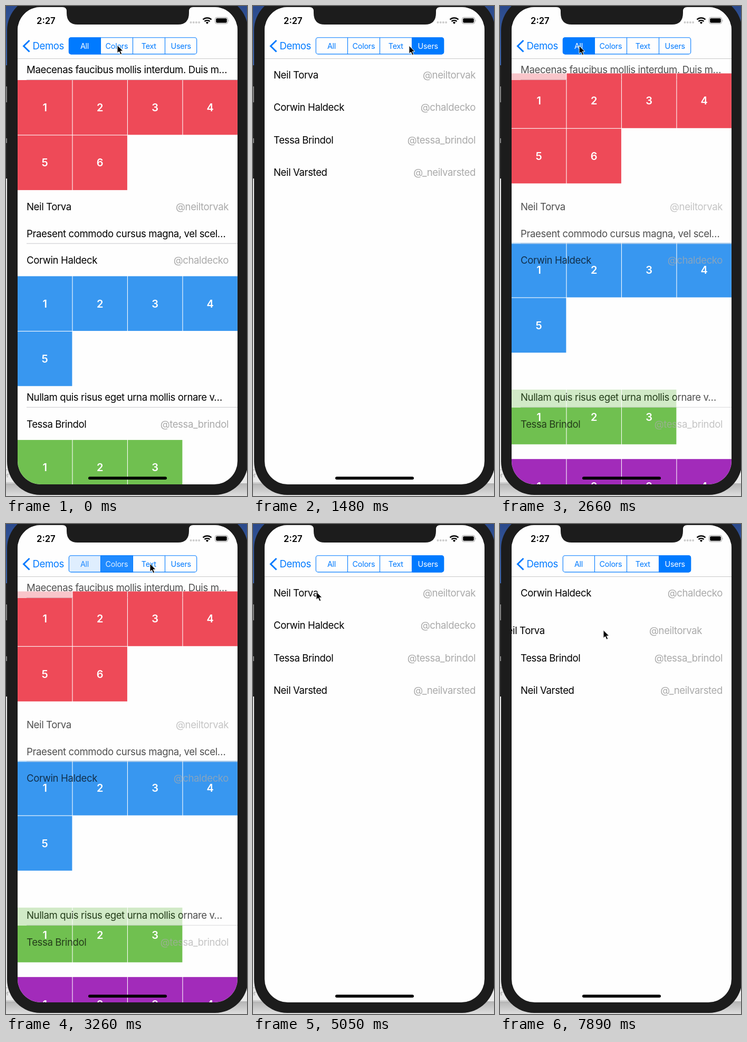
Animation, 457 px wide and 926 px high, one loop 8000 ms. Source, as an HTML page:

```html
<!DOCTYPE html>
<html lang="en">
<head>
<meta charset="utf-8">
<title>Mixed list demo</title>
<style>
  html, body { margin: 0; width: 100%; height: 100%; overflow: hidden; }
  svg { display: block; width: 457px; height: 926px; font-family: Inter, "Liberation Sans", sans-serif; }
  .body { font-size: 18.6px; letter-spacing: -.4px; }
  .handle { fill: #aaa; text-anchor: end; }
  .digit { font-size: 20px; font-weight: 600; fill: #fff; text-anchor: middle; }
  .segment { font-size: 14.4px; letter-spacing: -.25px; text-anchor: middle; }
</style>
</head>
<body>
<svg id="stage" viewBox="0 0 457 926">
  <defs>
    <clipPath id="screen"><rect x="22" y="2" width="417" height="902" rx="44"/></clipPath>
    <clipPath id="pill"><rect x="118.8" y="59.2" width="243.4" height="32.2" rx="4.5"/></clipPath>
    <linearGradient id="sky" x2="0" y2="1">
      <stop stop-color="#2b4a8c"/><stop offset="1" stop-color="#3d66ad"/>
    </linearGradient>
    <linearGradient id="floor" x2="0" y2="1">
      <stop stop-color="#b4b4b4"/><stop offset="1" stop-color="#dedede"/>
    </linearGradient>
  </defs>

  <rect width="457" height="926" fill="#e9e9e9"/>
  <rect width="457" height="112" fill="url(#sky)"/>
  <path d="M0 112h8v214H0z" fill="#222"/>
  <path d="M0 152h8v30H0zM0 250h8v9H0z" fill="#808080"/>
  <path d="M0 876.5h20M0 900.5h40" stroke="#bbb"/>
  <text x="-5" y="891" font-size="11" fill="#999">er</text>
  <rect y="902" width="457" height="24" fill="url(#floor)"/>
  <rect x="2" y="-17" width="457" height="941" rx="63" fill="#1c1c1c"/>

  <g clip-path="url(#screen)">
    <rect x="22" y="2" width="417" height="902" fill="#fefefe"/>
    <g id="list"></g>
    <rect x="22" y="2" width="417" height="97" fill="#fefefe"/>
    <path d="M22 99.5h417" stroke="#c9c9c9"/>
    <rect x="156" y="889.5" width="149" height="5.5" rx="2.75"/>
  </g>
  <path d="M107 0V2Q115 2 115 10V13Q115 35 136 35H326Q347 35 347 13V10Q347 2 355 2V0Z" fill="#1c1c1c"/>

  <text x="58" y="33.5" font-size="16.7" font-weight="600">2:27</text>
  <path d="M350.5 31h17" stroke="#ccc" stroke-width="4" stroke-linecap="round" stroke-dasharray="0 5.2"/>
  <path d="M373.5 25.7a11.8 11.8 0 0 1 16 0M376.5 29a7.5 7.5 0 0 1 10 0" fill="none" stroke="#000" stroke-width="2.4"/>
  <path d="M381.5 34l-2.7-2.8a3.9 3.9 0 0 1 5.4 0z"/>
  <rect x="396.5" y="21.5" width="24" height="12" rx="3.4" fill="none" stroke="#999"/>
  <rect x="398.2" y="23.2" width="20.6" height="8.6" rx="2"/>
  <path d="M421.8 25.5q1.6 2 0 4z" fill="#999"/>

  <path d="M44.5 65L33.5 75.7L44.5 86.5" fill="none" stroke="#007aff" stroke-width="3"/>
  <text class="body" x="50.5" y="82.3" fill="#007aff">Demos</text>
  <g id="segments" clip-path="url(#pill)"></g>
  <path d="M179.5 60v31M240.5 60v31M301.5 60v31" stroke="#007aff" stroke-width="1.1"/>
  <rect x="119.3" y="59.7" width="242.4" height="31.2" rx="4" fill="none" stroke="#007aff" stroke-width="1.1"/>
  <path id="cursor" d="M0 0V15.2L3.5 12L6.1 17.8L8.8 16.6L6.2 11H11Z" stroke="#fff"/>
</svg>

<script>
const LOOP = 8000, FRAME = 148.8;
const LEFT = 22, TOP = 99.6, CELL = 103.4, PITCH = 104.5;
const TEXT_H = 40.4, USER_H = 61.16;

const el = id => document.getElementById(id);
const clamp = v => Math.max(0, Math.min(1, v));
const mix = (a, b, p) => a + (b - a) * p;
const smooth = v => { const x = clamp(v); return x * x * (3 - 2 * x); };
const progress = (time, start, duration) => smooth((time - start) / duration);

function add(parent, tag, attrs, text) {
  const node = document.createElementNS("http://www.w3.org/2000/svg", tag);
  for (const name in attrs) node.setAttribute(name, attrs[name]);
  if (text !== undefined) node.textContent = text;
  parent.appendChild(node);
  return node;
}

const list = el("list");

function textRow(label) {
  const g = add(list, "g", {});
  add(g, "rect", { x: LEFT, width: 417, height: TEXT_H, fill: "#fefefe" });
  add(g, "path", { d: `M39 ${TEXT_H - .6}H439`, stroke: "#c8c7cc" });
  add(g, "text", { class: "body", x: 39, y: 27.6 }, label);
  return { kind: "Text", height: TEXT_H, nodes: [g] };
}

function userRow(name, handle) {
  const g = add(list, "g", {});
  add(g, "text", { class: "body", x: 39, y: 37.7 }, name);
  add(g, "text", { class: "body handle", x: 422, y: 37.7 }, handle);
  return { kind: "Users", height: USER_H, nodes: [g] };
}

// The first cell gets its own node because it stacks differently from the rest.
function colorGrid(fill, count) {
  const nodes = [add(list, "g", {}), add(list, "g", {})];
  for (let i = 0; i < count; i++) {
    const x = LEFT + i % 4 * PITCH, y = Math.floor(i / 4) * PITCH;
    const g = nodes[i ? 1 : 0];
    add(g, "rect", { x, y, width: CELL, height: CELL, fill });
    add(g, "text", { class: "digit", x: x + CELL / 2, y: y + CELL / 2 + 7.2 }, i + 1);
  }
  return { kind: "Colors", height: Math.ceil(count / 4) * PITCH - 1.1, nodes };
}

const rows = [
  textRow("Maecenas faucibus mollis interdum. Duis m…"),
  colorGrid("#ee4a58", 6),
  userRow("Neil Torva", "@neiltorvak"),
  textRow("Praesent commodo cursus magna, vel scel…"),
  userRow("Corwin Haldeck", "@chaldecko"),
  colorGrid("#3897f0", 5),
  textRow("Nullam quis risus eget urna mollis ornare v…"),
  userRow("Tessa Brindol", "@tessa_brindol"),
  colorGrid("#70c050", 3),
  textRow("Fusce dapibus, tellus ac cursus commodo,…"),
  colorGrid("#a22bba", 7),
  userRow("Neil Varsted", "@_neilvarsted"),
];
const [firstText, firstGrid, dragged, , swapped] = rows;

const modes = ["All", "Colors", "Text", "Users"];
for (const mode of modes) {
  let y = TOP;
  for (const row of rows) {
    if (mode !== "All" && mode !== row.kind) continue;
    (row.tops ??= {})[mode] = y;
    y += row.height;
  }
}

for (const kind of ["Colors", "Text", "Users"])
  for (const row of rows) if (row.kind === kind) list.append(...row.nodes);
const firstOther = rows[3].nodes[0];

const segments = modes.map((label, i) => {
  const x = 119 + i * 60.9, g = el("segments");
  return {
    fill: add(g, "rect", { x, y: 59, width: 60.9, height: 33, fill: "#007aff" }),
    label: add(g, "text", { class: "segment", x: x + 30, y: 80.8 }, label),
  };
});

// [start, mode]
const taps = [
  [-1000, "All"], [250, "Colors"], [741, "Text"], [1090, "Users"], [1610, "Text"],
  [2158, "Colors"], [2480, "All"], [3152, "Colors"], [3550, "Text"], [4000, "Users"],
];

// [time, x, y]
const pointer = [
  [0, 211, 74], [280, 211, 75], [720, 271, 74], [883, 323, 71], [1090, 331, 75],
  [1330, 328, 75], [1600, 272, 75], [1850, 268, 75], [2110, 208, 74], [2222, 167, 72],
  [2420, 148, 75], [2660, 150, 75], [3100, 212, 75], [3264, 273, 75], [3520, 275, 75],
  [3710, 341, 74], [4050, 335, 75], [4300, 325, 82], [4603, 243, 122], [5040, 120, 128],
  [7000, 120, 128], [7876, 196, 200.5],
];

function pointerAt(time) {
  const next = pointer.findIndex(key => key[0] > time);
  if (next < 0) return pointer.at(-1).slice(1);
  const a = pointer[Math.max(0, next - 1)], b = pointer[next];
  const p = progress(time, a[0], b[0] - a[0] || 1);
  return [mix(a[1], b[1], p), mix(a[2], b[2], p)];
}

function place(row, x, y, opacity) {
  for (const node of row.nodes) {
    node.setAttribute("transform", `translate(${x.toFixed(2)} ${y.toFixed(2)})`);
    node.setAttribute("opacity", opacity);
    node.setAttribute("visibility", opacity > 0 ? "visible" : "hidden");
  }
}

function drawSegments(from, to, elapsed) {
  const q = 1 - (1 - clamp(elapsed / 220)) ** 3;
  segments.forEach(({ fill, label }, i) => {
    const on = modes[i] === to ? q : modes[i] === from ? 1 - q : 0;
    fill.setAttribute("opacity", on);
    label.setAttribute("fill", `rgb(${255 * on},${mix(122, 255, on)},255)`);
  });
}

function drawRows(from, to, p) {
  const [lead, rest] = firstGrid.nodes, text = firstText.nodes[0];
  const order = to === "Text" ? [rest, text, lead] : [lead, text, rest];
  for (const node of order) list.insertBefore(node, firstOther);
  for (const row of rows) {
    const a = row.tops[from], b = row.tops[to];
    const opacity = (a === undefined ? 0 : 1 - p) + (b === undefined ? 0 : p);
    place(row, 0, mix(a ?? b ?? 0, b ?? a ?? 0, p), opacity);
  }
}

function drawDrag(time, x, y) {
  const lift = progress(time, 6850, 200);
  if (!lift) return;
  place(dragged, (x - 235) * lift, mix(TOP, y - USER_H / 2, lift), 1);
  place(swapped, 0, TOP + USER_H * (1 - progress(time, 7460, 300)), 1);
}

function render(time) {
  const index = taps.findLastIndex(tap => tap[0] <= time);
  const [start, to] = taps[index];
  const from = taps[Math.max(0, index - 1)][1];
  const [x, y] = pointerAt(time);
  drawSegments(from, to, time - start);
  drawRows(from, to, progress(time, start, 300));
  drawDrag(time, x, y);
  el("cursor").setAttribute("transform", `translate(${x} ${y})`);
}

let shown = -1;
function tick() {
  const frame = Math.floor((performance.now() % LOOP + 22) / FRAME);
  if (frame !== shown) render(Math.max(0, frame * FRAME - 10));
  shown = frame;
  requestAnimationFrame(tick);
}
tick();
</script>
</body>
</html>
```
